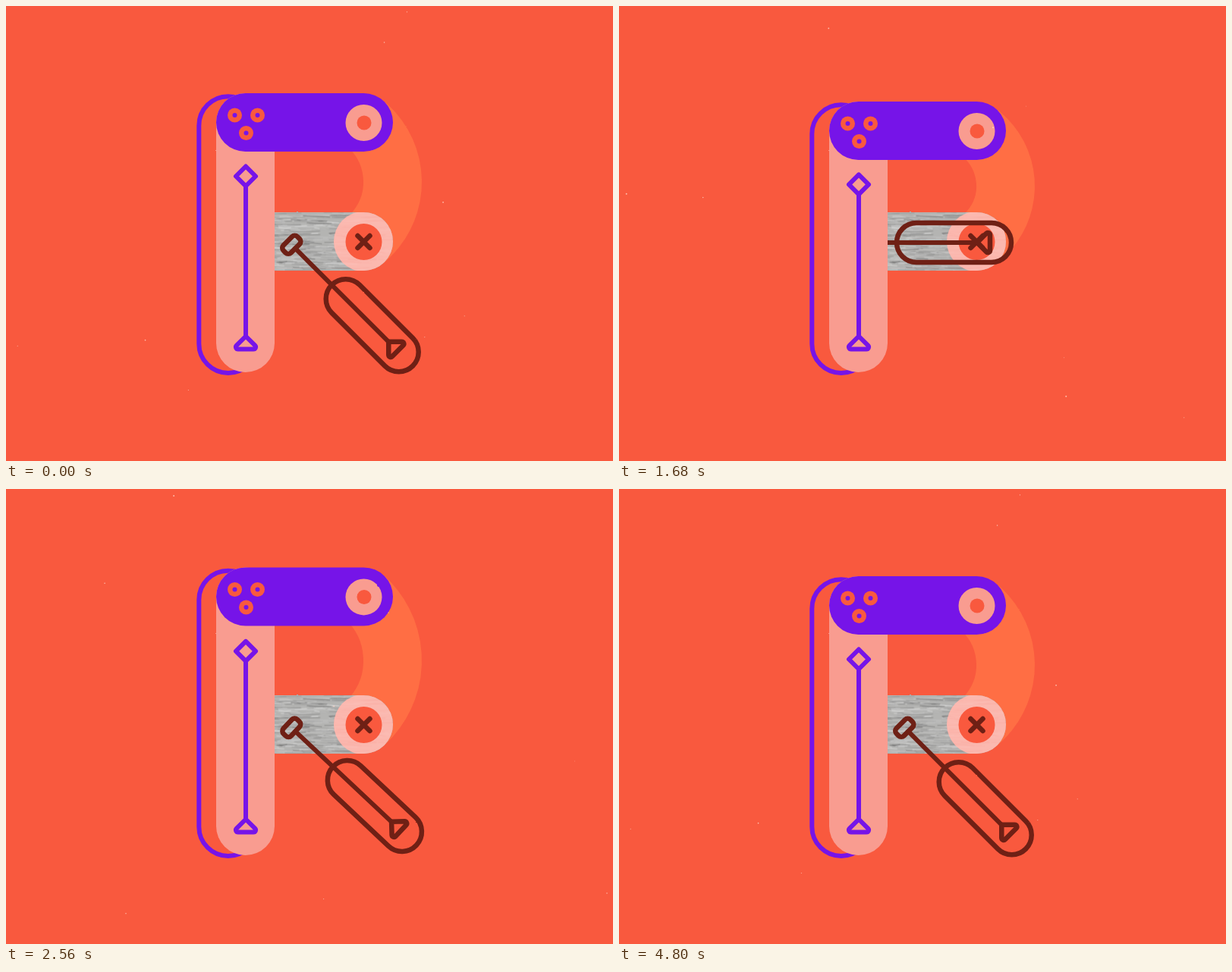
Recreate the animation shown at these times as an HTML page with a canvas. Size 800x600 px, loop 4840 ms.

```html
<!DOCTYPE html>
<html lang="en">
<head>
<meta charset="utf-8">
<title>Letter R</title>
<style>
  html, body { margin: 0; width: 100%; height: 100%; overflow: hidden; background: #f9593e; }
  canvas { display: block; filter: url(#rough); }
  svg { position: absolute; }
</style>
</head>
<body>
<svg width="0" height="0">
  <filter id="rough" x="0" y="0" width="1" height="1" color-interpolation-filters="sRGB">
    <feTurbulence type="fractalNoise" baseFrequency=".16" seed="4" result="noise"/>
    <feDisplacementMap in="SourceGraphic" in2="noise" scale="1.6" xChannelSelector="R" yChannelSelector="G"/>
  </filter>
</svg>
<canvas id="stage" width="800" height="600"></canvas>
<script>
const RED = '#f9593e', PURPLE = '#7614e8', PINK = '#f99c90', ORANGE = '#ff6e44', BROWN = '#6f2015';
const LOOP = 4840, STEP = 40, TAU = 2 * Math.PI;
const R = 38.5, STEM_X = 315.5, END_X = 471.5, SPAN = END_X - STEM_X, WOOD_Y = 310.5;
const ctx = document.getElementById('stage').getContext('2d');

function random(seed) {
  return () => {
    seed = (seed + 0x6d2b79f5) | 0;
    let n = Math.imul(seed ^ (seed >>> 15), 1 | seed);
    n = (n + Math.imul(n ^ (n >>> 7), 61 | n)) ^ n;
    return ((n ^ (n >>> 14)) >>> 0) / 4294967296;
  };
}

// 0 before start, 1 after end, sine ease between
function ease(t, start, end) {
  const p = Math.min(1, Math.max(0, (t - start) / (end - start)));
  return (1 - Math.cos(Math.PI * p)) / 2;
}

function fill(color) { ctx.fillStyle = color; ctx.fill(); }
function stroke(color, width = 6) { ctx.strokeStyle = color; ctx.lineWidth = width; ctx.stroke(); }

function disc(x, y, r, color) {
  ctx.beginPath();
  ctx.arc(x, y, r, 0, TAU);
  fill(color);
}

function roundBox(x, y, w, h, r) {
  ctx.beginPath();
  ctx.roundRect(x, y, w, h, r);
}

function line(x1, y1, x2, y2, color, width) {
  ctx.beginPath();
  ctx.moveTo(x1, y1);
  ctx.lineTo(x2, y2);
  stroke(color, width);
}

// Right-angled arrowhead with its tip at x, y and soft base corners
function head(x, y, angle, color, width) {
  const depth = 17;
  ctx.save();
  ctx.translate(x, y);
  ctx.rotate(angle);
  ctx.beginPath();
  ctx.moveTo(0, 0);
  ctx.arcTo(depth, depth, 0, depth, 2.8);
  ctx.arcTo(-depth, depth, 0, 0, 2.8);
  ctx.closePath();
  stroke(color, width);
  ctx.restore();
}

const wood = document.createElement('canvas');
wood.width = 160;
wood.height = 78;
{
  const w = wood.getContext('2d'), rnd = random(11);
  w.fillStyle = '#b4b4b2';
  w.fillRect(0, 0, 160, 78);
  for (let i = 0; i < 500; i++) {
    const g = 100 + rnd() * 135, x = rnd() * 190 - 30, y = rnd() * 78, len = 6 + rnd() * 36;
    w.strokeStyle = `rgba(${g},${g},${g},.6)`;
    w.lineWidth = 0.5 + rnd();
    w.beginPath();
    w.moveTo(x, y);
    w.quadraticCurveTo(x + len / 2, y + rnd() * 3 - 1.5, x + len, y + rnd() * 3 - 1);
    w.stroke();
  }
}

// Arc through the ends of bar and wood, drawn from the bar downwards
function drawArc(top, amount) {
  if (amount <= 0) return;
  const y = top + R, half = (WOOD_Y - y) / 2, bulge = 38;
  const radius = (half * half + bulge * bulge) / (2 * bulge), a = Math.asin(half / radius);
  ctx.beginPath();
  ctx.arc(END_X + bulge - radius, y + half, radius, -a, -a + 2 * a * amount);
  ctx.lineCap = 'butt';
  stroke(ORANGE, 2 * R);
  ctx.lineCap = 'round';
}

function drawWood(x) {
  const y = WOOD_Y;
  ctx.save();
  roundBox(x - 200, y - R, 200 + R, 2 * R, R);
  ctx.clip();
  ctx.drawImage(wood, x - 120, y - 39);
  disc(x, y, R + 1, PINK);
  ctx.clip();
  ctx.globalAlpha = 0.4;
  ctx.globalCompositeOperation = 'screen';
  ctx.drawImage(wood, x - 120, y - 39);
  ctx.restore();
  disc(x, y + 0.5, 24, RED);
  for (const s of [8, -8]) line(x - 8, y + 0.5 - s, x + 8, y + 0.5 + s, BROWN, 6.5);
}

function drawLeg(x, y, degrees) {
  const width = 6.5;
  ctx.save();
  ctx.translate(x, y);
  ctx.rotate(degrees * Math.PI / 180);
  roundBox(-8, -13, 14, 26, 5);
  stroke(BROWN, width);
  line(6, 0, 180, 0, BROWN);
  roundBox(74, -26, 151, 52, 26);
  stroke(BROWN, width);
  head(180, 0, -Math.PI / 2, BROWN, width);
  ctx.restore();
}

function drawStem(top, diamondY) {
  roundBox(254.3, top + 4.2, 2 * R, 479.8 - top, R);
  stroke(PURPLE);
  roundBox(STEM_X - R, top, 2 * R, 483 - top, R);
  fill(PINK);
  ctx.beginPath();
  for (let i = 0; i < 4; i++) {
    ctx.lineTo(316 + 13 * Math.cos(i * TAU / 4), diamondY + 13 * Math.sin(i * TAU / 4));
  }
  ctx.closePath();
  stroke(PURPLE);
  line(316, diamondY + 13, 316, 435, PURPLE);
  head(316, 435.5, 0, PURPLE);
}

function drawBar(top, reach, scale) {
  if (scale <= 0) return;
  const x = SPAN * reach, grow = Math.min(1, reach * 1.5);
  ctx.save();
  ctx.translate(STEM_X, top + R);
  ctx.scale(scale, scale);
  roundBox(-R, -R, x + 2 * R, 2 * R, R);
  fill(PURPLE);
  for (let i = 0; i < 3; i++) {
    const dx = 1 + 15 * (i - 1), dy = i % 2 ? 14 : -9.5;
    disc(dx, dy, 9.5, RED);
    disc(dx, dy, 3, PURPLE);
  }
  disc(x, 0.5, 24 * grow, PINK);
  disc(x + 0.5, 0.5, 9.5 * grow, RED);
  ctx.restore();
}

function drawDust(seed) {
  const rnd = random(seed);
  for (let i = 0; i < 8; i++) {
    disc(rnd() * 800, rnd() * 565, 0.4 + rnd() * 0.6, 'rgba(255,214,200,.8)');
  }
}

function draw(t) {
  // The letter folds into its stem, unfolds, overshoots and settles
  const fold = ease(t, 40, 1120) - ease(t, 1120, 1690);
  const stretch = ease(t, 1690, 2260), settle = ease(t, 2260, 2880);
  const shown = (hide, hidden, show, full) => 1 - ease(t, hide, hidden) + ease(t, show, full);
  const turn = shown(40, 600, 1720, 2250);
  const slide = shown(600, 1040, 1300, 1680);
  const arc = shown(440, 720, 1400, 1680);
  const woodReach = shown(620, 1080, 1160, 1520);
  const barReach = shown(640, 1000, 1220, 1520);
  const barScale = shown(920, 1100, 1130, 1300);

  const unfolded = 115 + 11 * ease(t, 1120, 1690);
  const top = unfolded + 39.5 * fold - 33 * stretch + 22 * settle;
  const diamondY = top + 109.5 - 65.5 * fold + 2 * (stretch - settle);

  ctx.fillStyle = RED;
  ctx.fillRect(0, 0, 800, 600);
  ctx.lineCap = ctx.lineJoin = 'round';
  drawArc(top, arc);
  // Wood and leg slide out from behind the stem
  ctx.save();
  ctx.beginPath();
  ctx.rect(STEM_X, 0, 800, 600);
  ctx.clip();
  drawWood(STEM_X + SPAN * woodReach);
  drawLeg(292 + 85 * turn - 182 * (1 - slide), 312 + 3.5 * turn, 45 * turn - 3.3 * (stretch - settle) * turn);
  ctx.restore();
  drawStem(top, diamondY);
  drawBar(top, barReach, barScale);
  drawDust(Math.floor(t / 80) % 30 * 977 + 5);
}

function tick() {
  const t = performance.now() % LOOP;
  draw(Math.floor(t / STEP) * STEP);
  requestAnimationFrame(tick);
}
tick();
</script>
</body>
</html>
```
